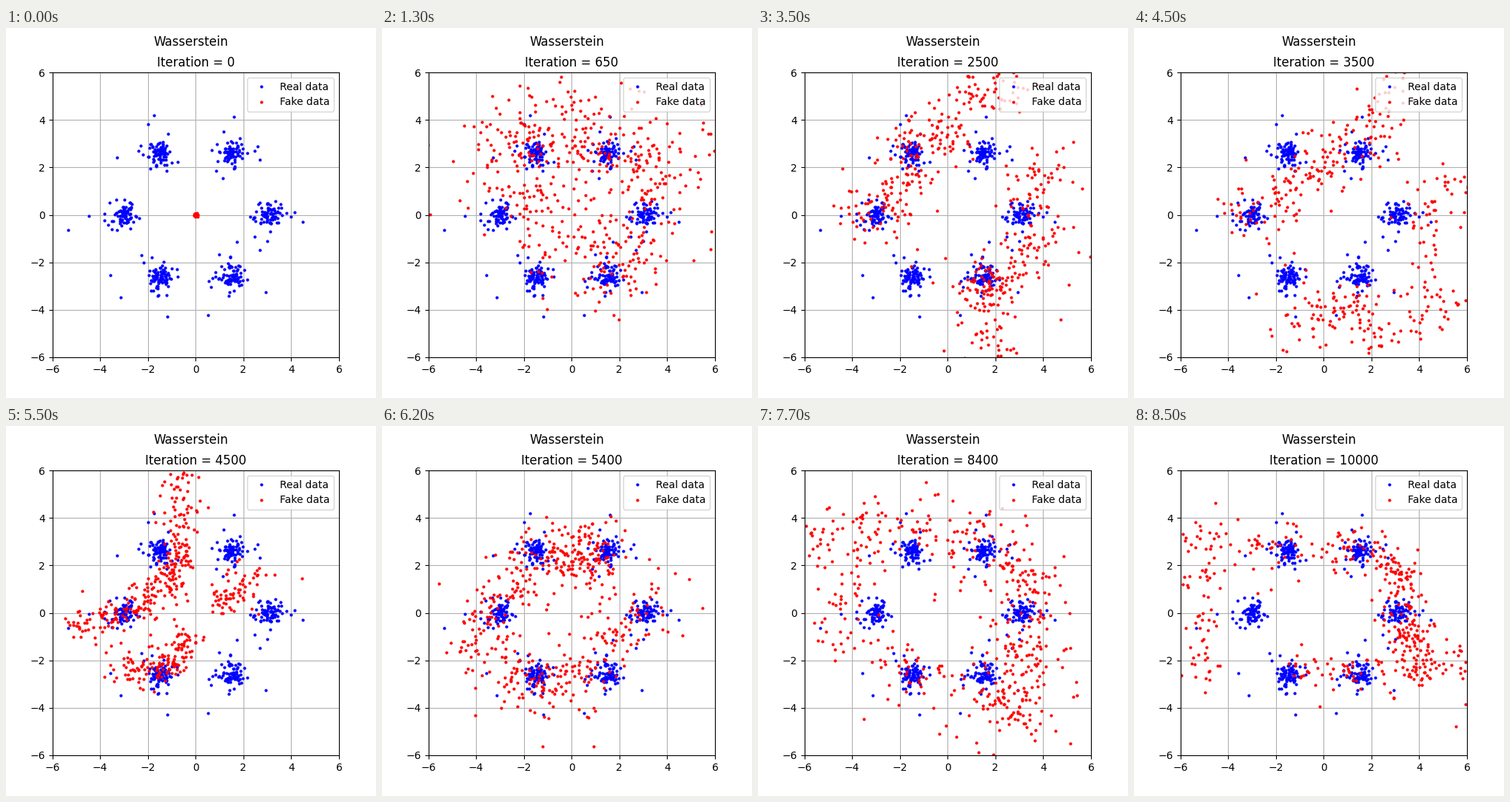
Animation, 500 px wide and 500 px high, one loop 8.6 s. Source, as a matplotlib script:

```python
import numpy as np
import matplotlib.pyplot as plt
from matplotlib.animation import FuncAnimation

FRAMES = 86
N_FAKE = 480
N_CLUSTER = 80

rng = np.random.default_rng(12)


def iteration(i):
    """Training step shown by frame i: the stride grows as training goes on."""
    return 50 * i + 50 * max(i - 20, 0) + 100 * max(i - 60, 0)


def ring(r, n):
    """Points clockwise round a circle, starting and ending on the left."""
    a = np.linspace(np.pi, -np.pi, n + 1)
    return np.column_stack([r * np.cos(a), r * np.sin(a)])


def noise(n):
    """Round noise with a dense middle and a few stragglers."""
    return rng.normal(size=(n, 2)) / np.sqrt(rng.chisquare(5, (n, 1)) / 5)


# Real samples: six tight clusters on a circle and the farthest outliers
outliers = [(-5.34, -.64), (-4.47, -.05), (-3.57, -2.54), (-3.14, -3.48),
            (-1.18, -4.29), (.52, -4.22), (2.93, -3.26), (2.69, -1.48),
            (3.99, -.08), (1.6, 4.13), (-1.74, 4.19), (-3.29, 2.42)]
clusters = [c + 0.25 * noise(N_CLUSTER) for c in ring(3, 6)[:-1]]
real = np.concatenate(clusters + [outliers])

# Fake samples: each has a fixed place along a strand and a fixed offset from it
along = (np.arange(N_FAKE) + rng.random(N_FAKE)) / N_FAKE
offset = noise(N_FAKE)
poses = []


def pose(frame, spread, *strands):
    """Share the samples evenly among the segments of the strands."""
    segs = np.array([(a, b) for s in strands for a, b in zip(s, s[1:])])
    k, t = np.divmod(along * len(segs), 1)
    a, b = segs[k.astype(int)].swapaxes(0, 1)
    poses.append((frame, a + (b - a) * t[:, None] + spread * offset))


pose(0, .012, [(0, 0), (0, 0)])
pose(13, .85, [(.3, -1.2), (-1.7, .3), (-3.2, 2.6), (-1.6, 3.4), (.8, 4.2),
               (1, 2), (4.2, 3), (3, .6), (2.4, -2.6), (.8, -1.8)])
pose(25, .6, [(-3.9, 2.6), (-2.2, 1.2), (-1.8, 4), (-.6, 2), (1.4, .6),
              (3.2, -.6), (1.3, -.9), (-.4, -2.4), (1.6, -2.9), (1.7, -5.5)])
pose(45, .55, [(-4, .3), (-1.6, .4), (-.6, 2.2), (1.3, 2.7), (2.6, 4.6),
               (5, 9), (7, 9)],
     [(7, 2), (3.7, .2), (5.4, -4), (1.8, -5.2), (1, -3.6), (-1.2, -4.6),
      (-1.5, -9)])
pose(55, .33, [(-5.2, -.5), (-2.7, .1), (-1.1, 1.2), (-.6, 2.7), (-.6, 6)],
     [(2.2, 1.7), (.9, .1)],
     [(-.3, -.8), (-1.2, -2.4), (-3.2, -2.4)])
pose(69, .95, ring(3.9, 12))
pose(85, .42, [(-9, 3), (-4.5, 3.1), (1, 2.7), (3.2, 2), (3.4, 0),
               (3.8, -1.4), (4, -2.5), (9, -2.6)],
     [(3, -2.4), (-1.5, -2.5)],
     [(-5, -3), (-5, 2)])


def fake(i):
    """Ease between the neighbouring poses with a slight swirl on the way."""
    j = max(n for n in range(len(poses) - 1) if poses[n][0] <= i)
    (f0, p0), (f1, p1) = poses[j], poses[j + 1]
    s = (i - f0) / (f1 - f0)
    ease = s * (2 - s) if j == 0 else s * s * (3 - 2 * s)
    turn = 0.3 * np.sin(np.pi * s) * (-1) ** j
    c, d = np.cos(turn), np.sin(turn)
    return (p0 + (p1 - p0) * ease) @ np.array([[c, d], [-d, c]])


fig, ax = plt.subplots(figsize=(5, 5), dpi=100)
fig.suptitle("Wasserstein")
ax.plot(*real.T, "b.", ms=4, label="Real data")
dots, = ax.plot([], [], "r.", ms=4, label="Fake data")
ax.set(xlim=(-6, 6), ylim=(-6, 6))
ax.grid(True)
ax.legend(loc="upper right")
title = ax.set_title("")


def draw(i):
    dots.set_data(*fake(i).T)
    title.set_text(f"Iteration = {iteration(i)}")
    return dots, title


anim = FuncAnimation(fig, draw, frames=FRAMES, interval=100, repeat=True,
                     repeat_delay=0, blit=False)
plt.show()
```
